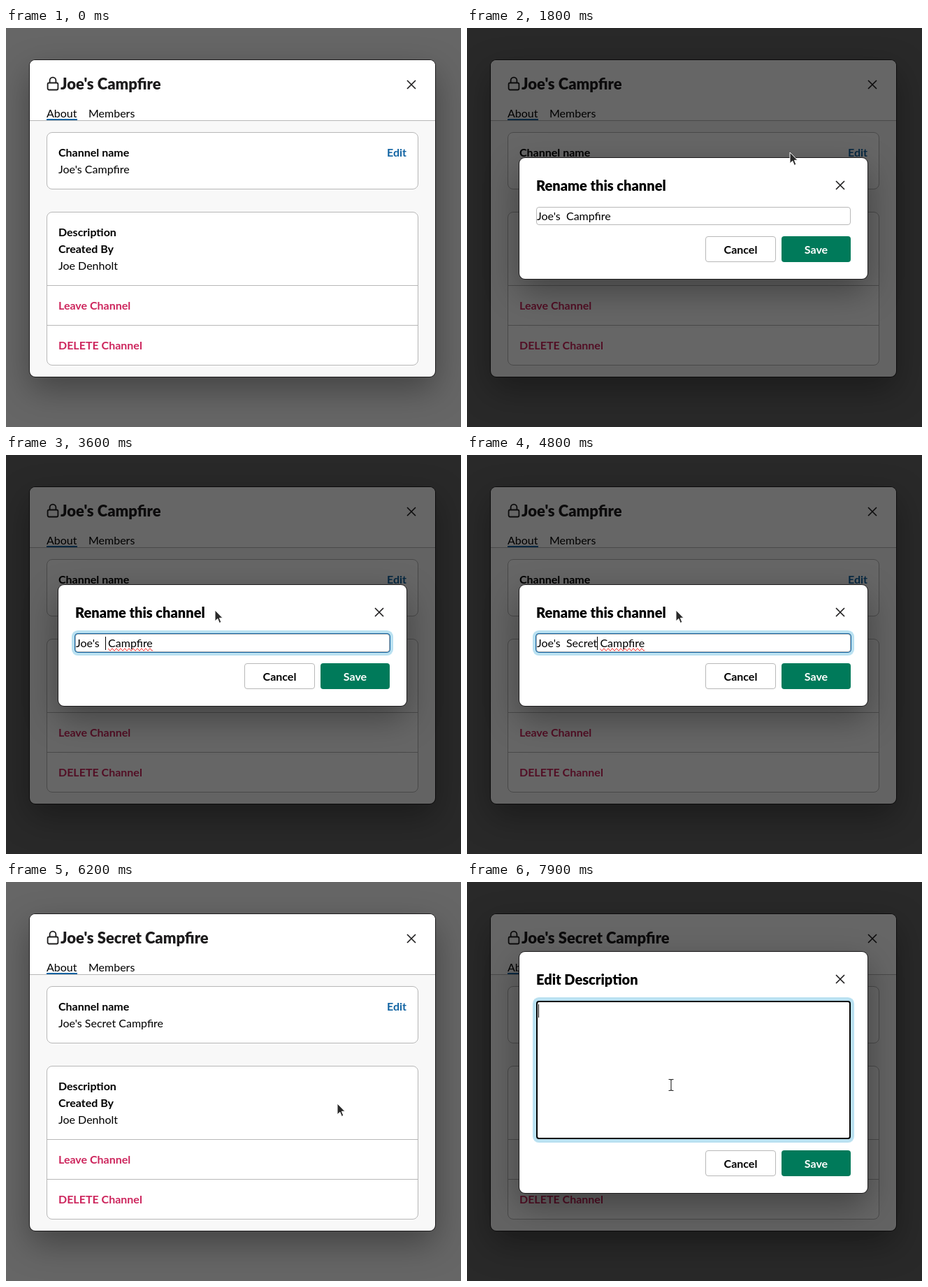
Write an HTML page that moves like this. It is 651 by 571 pixels and loops after 8 s.

```html
<!DOCTYPE html>
<html lang="en">
<head>
<meta charset="utf-8">
<title>Channel settings</title>
<style>
* { box-sizing: border-box; margin: 0; }
html, body { width: 100%; height: 100%; overflow: hidden; background: #666; }
body { position: relative; font: 16px/24px Lato, sans-serif; color: #000; cursor: default; }
b { font-weight: 700; }
.abs, .modal, .card, .btn, .close, .field, .overlay, #cursor { position: absolute; }
.abs { white-space: pre; }
.modal {
  border-radius: 8px; background: #fff;
  box-shadow: 0 0 0 1px #1d1c1d, 0 18px 48px rgba(0, 0, 0, .35);
}
#main { left: 34px; top: 46px; width: 580px; height: 453px; background: #f8f8f8; }
.head { height: 87px; background: #fff; border-bottom: 1px solid #b8b8b8; border-radius: 8px 8px 0 0; }
h1, h2 { font-weight: 900; line-height: 28px; white-space: pre; position: absolute; }
h1 { left: 44px; top: 20px; font-size: 22px; color: #1d1c1d; }
h2 { left: 24px; top: 25px; font-size: 20px; }
.tabline { left: 24px; top: 84px; width: 44px; height: 2px; background: #1264a3; }
.card { left: 24px; width: 532px; border: 1px solid #b8b8b8; border-radius: 8px; background: #fff; overflow: hidden; }
.row { padding: 16px; white-space: pre; }
.row + .row { border-top: 1px solid #b8b8b8; }
.hover { background: #f8f8f8; }
.edit { right: 16px; top: 16px; color: #1264a3; }
.danger { color: #cd265d; }
.overlay { inset: 0; background: rgba(0, 0, 0, .6); }
.dialog { left: 75px; width: 498px; }
#rename { top: 186px; height: 173px; }
#describe { top: 100px; height: 345px; }
.field { left: 24px; top: 70px; width: 450px; border: 1px solid #b8b8b8; border-radius: 4px; white-space: pre; background: #fff; }
#name { height: 26px; }
#name.focus { box-shadow: 0 0 0 1px #1264a3, 0 0 0 5px rgba(29, 155, 209, .3); }
#text { height: 198px; }
#text.focus { border: 2px solid #000; box-shadow: 0 0 0 5px rgba(29, 155, 209, .3); }
#text .caret { left: 1px; top: 3px; }
.caret { position: absolute; width: 1px; height: 19px; top: 3px; background: #000; }
.typo { text-decoration: underline wavy 1px #d22; text-decoration: spelling-error; }
.btn { bottom: 24px; height: 37px; line-height: 37px; border-radius: 4px; text-align: center; font-weight: 700; }
.cancel { left: 266px; width: 101px; border: 1px solid #b8b8b8; line-height: 35px; }
.save { left: 375px; width: 99px; background: #007a5a; color: #fff; }
.save.hot { background: #148567; box-shadow: 0 1px 4px rgba(0, 0, 0, .3); }
.close { width: 16px; height: 16px; stroke: #1d1c1d; stroke-width: 1.6; }
.dialog .close { left: 451px; top: 30.5px; }
#main .close { left: 537.5px; top: 26.5px; }
#cursor { left: 0; top: 0; width: 1px; height: 1px; overflow: visible; }
[hidden] { display: none !important; }
</style>
</head>
<body>
<div class="modal" id="main">
  <div class="head"></div>
  <svg class="abs" style="left:24px;top:23px" width="18" height="22" fill="none" stroke="#1d1c1d" stroke-width="1.8">
    <rect x="1.6" y="9.5" width="14.8" height="10" rx="2"/>
    <path d="M4.6 9.5V6a4.4 4.4 0 0 1 8.8 0v3.5"/>
  </svg>
  <h1 class="title"></h1>
  <svg class="close"><path d="M2 2l12 12M14 2L2 14"/></svg>
  <span class="abs" style="left:24px;top:64px">About</span>
  <span class="abs" style="left:84px;top:64px">Members</span>
  <div class="abs tabline"></div>
  <div class="card" style="top:103px">
    <div class="row" id="nameRow"><b>Channel name</b><br><span class="title"></span></div>
    <b class="abs edit">Edit</b>
  </div>
  <div class="card" style="top:217px">
    <div class="row" id="descRow"><b>Description</b><br><b>Created By</b><br>Joe Denholt</div>
    <div class="row danger"><b>Leave Channel</b></div>
    <div class="row danger"><b>DELETE Channel</b></div>
  </div>
</div>
<div class="overlay" id="shade"></div>
<div class="modal dialog" id="rename">
  <h2>Rename this channel</h2>
  <svg class="close"><path d="M2 2l12 12M14 2L2 14"/></svg>
  <div class="field" id="name"><span id="before"></span><i class="caret"></i><span id="after"> <span id="word">Campfire</span></span></div>
  <div class="btn cancel">Cancel</div>
  <div class="btn save">Save</div>
</div>
<div class="modal dialog" id="describe">
  <h2>Edit Description</h2>
  <svg class="close"><path d="M2 2l12 12M14 2L2 14"/></svg>
  <div class="field" id="text"><i class="caret"></i></div>
  <div class="btn cancel">Cancel</div>
  <div class="btn save">Save</div>
</div>
<svg id="cursor">
  <path id="arrow" d="M0 0V15.8L3.8 12.3L6.3 18.4L8.9 17.3L6.4 11.3H11Z" fill="#2a2a2a" stroke="#fff"/>
  <g id="hand" stroke="#222" stroke-width="1.1" stroke-linejoin="round">
    <path fill="#fff" d="M-1.6 10V1.6a1.6 1.6 0 0 1 3.2 0V6.6l7 1.2a2.2 2.2 0 0 1 1.9 2.2v3l-1.7 4.6H1L-4.7 10.8a1.5 1.5 0 0 1 2.1-2z"/>
    <path fill="none" d="M1.6 6.6V9.5M4.6 7.2V9.7M7.5 7.7V9.9"/>
  </g>
  <g id="beam" fill="none">
    <path d="M-3.5 -7.5H-1L0 -6.5L1 -7.5H3.5M0 -6.5V7.5M-3.5 8.5H-1L0 7.5L1 8.5H3.5" stroke="#fff" stroke-width="2.6"/>
    <path d="M-3.5 -7.5H-1L0 -6.5L1 -7.5H3.5M0 -6.5V7.5M-3.5 8.5H-1L0 7.5L1 8.5H3.5" stroke="#222" stroke-width="1.1"/>
  </g>
</svg>
<script>
const LOOP = 8000, TICK = 100;
const $ = id => document.getElementById(id);

// Pointer path: time, x, y
const path = [
  [800, 146, 23], [900, 377, 119], [1000, 377, 119], [1100, 425, 165], [1200, 447, 176],
  [1500, 447, 176], [1700, 465, 176], [1800, 462, 178], [2100, 300, 226], [2400, 150, 267],
  [2600, 137, 269], [2700, 137, 269], [2800, 225, 244], [2900, 299, 222], [5200, 299, 222],
  [5500, 390, 275], [5800, 474, 317], [7000, 474, 317], [7100, 458, 318], [7300, 384, 320],
  [7500, 358, 313], [7700, 318, 299], [7900, 292, 290]
];
const typing = [3600, 4000, 4200, 4400, 4600, 4700, 4800];

function pointerAt(t) {
  const next = path.findIndex(p => p[0] > t);
  if (next < 0) return path[path.length - 1].slice(1);
  const [t0, x0, y0] = path[next - 1], [t1, x1, y1] = path[next];
  const k = (t - t0) / (t1 - t0);
  return [x0 + (x1 - x0) * k, y0 + (y1 - y0) * k];
}

const between = (v, a, b) => v >= a && v < b;
const show = (el, on) => el.toggleAttribute('hidden', !on);

function render(t) {
  const renaming = between(t, 1800, 6200);
  const describing = t >= 7500;
  const nameFocus = between(t, 2700, 6000);
  const textFocus = t >= 7800;
  const visible = t >= 800;
  const [x, y] = visible ? pointerAt(t) : [-50, -50];
  const inside = (l, top, r, b) => between(x, l, r) && between(y, top, b);

  const title = t >= 6200 ? "Joe's Secret Campfire" : "Joe's Campfire";
  document.querySelectorAll('.title').forEach(el => { el.textContent = title; });

  show($('shade'), renaming || describing);
  show($('rename'), renaming);
  show($('describe'), describing);

  const free = !renaming && !describing;
  const overName = free && inside(58, 149, 590, 231);
  const overDesc = free && inside(58, 263, 590, 368) && !between(t, 6200, 6300);
  $('nameRow').classList.toggle('hover', overName);
  $('descRow').classList.toggle('hover', overDesc);

  const count = typing.filter(at => t >= at).length;
  $('before').textContent = "Joe's " + ' Secret'.slice(0, count);
  $('word').classList.toggle('typo', nameFocus && count > 0);
  $('name').classList.toggle('focus', nameFocus);
  const blinkOff = between(t, 3200, 3600) || between(t, 5300, 5800);
  show($('name').querySelector('.caret'), nameFocus && !blinkOff);
  $('text').classList.toggle('focus', textFocus);
  show($('text').querySelector('.caret'), textFocus);

  const overSave = renaming && inside(450, 298, 549, 335);
  $('rename').querySelector('.save').classList.toggle('hot', overSave);

  const overField = renaming && inside(99, 256, 549, 282) || describing && inside(99, 170, 549, 368);
  const kind = overField ? 'beam' : overName || overDesc || overSave ? 'hand' : 'arrow';
  for (const id of ['arrow', 'hand', 'beam']) $(id).style.display = id === kind ? '' : 'none';
  show($('cursor'), visible);
  $('cursor').style.transform = `translate(${Math.round(x)}px, ${Math.round(y)}px)`;
}

const start = performance.now();
function frame() {
  const t = (performance.now() - start) % LOOP;
  render(Math.floor(t / TICK) * TICK);
  requestAnimationFrame(frame);
}
frame();
</script>
</body>
</html>
```
